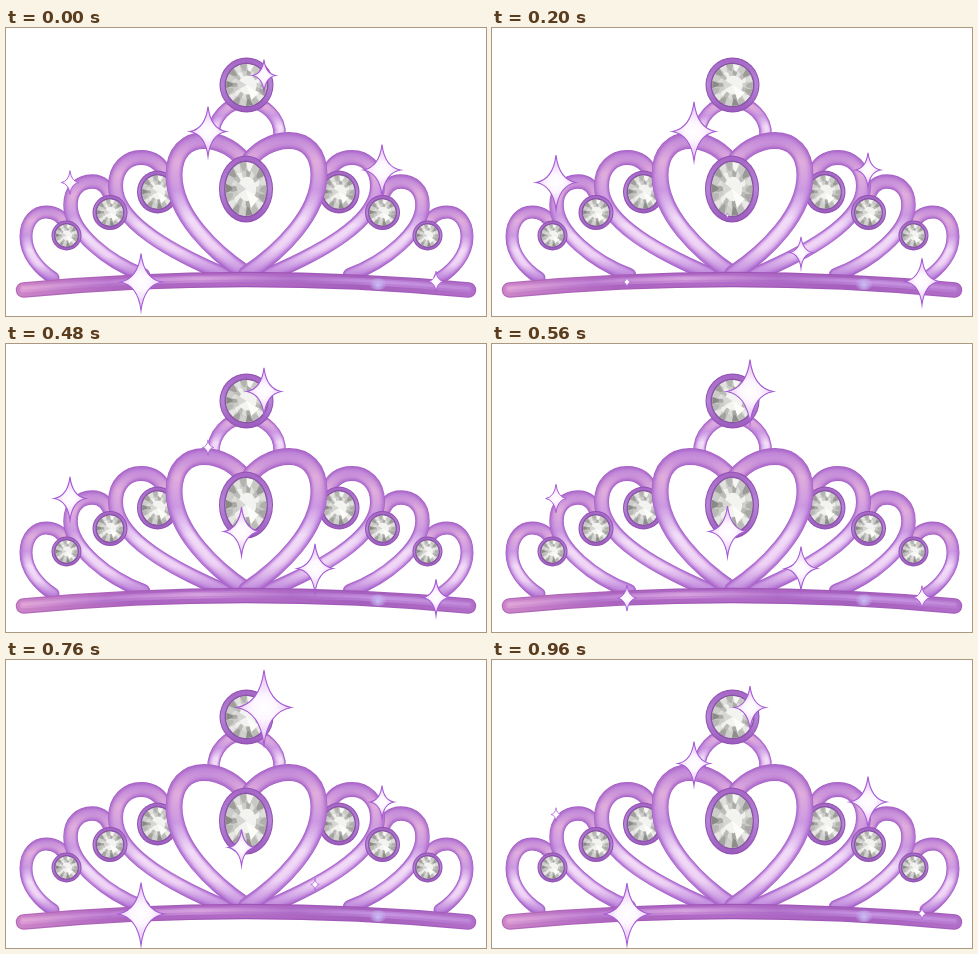
An HTML page with a canvas for the animation above (1000 ms loop, 480 by 288 pixels).

```html
<!DOCTYPE html>
<html>
<head>
<meta charset="utf-8">
<style>
html, body { margin: 0; width: 100%; height: 100%; overflow: hidden; background: #fff; }
canvas { display: block; }
</style>
</head>
<body>
<canvas id="stage" width="480" height="288"></canvas>
<script>
const LOOP = 1000, STEP = 40, SPAN = 377, AXIS = 481;
const ctx = stage.getContext('2d');
const tiara = document.createElement('canvas');
tiara.width = 480;
tiara.height = 288;
const g = tiara.getContext('2d');

function gradient(x0, y0, x1, y1, colors) {
  const fill = g.createLinearGradient(x0, y0, x1, y1);
  colors.forEach((c, i) => fill.addColorStop(i / (colors.length - 1), c));
  return fill;
}

// A shaded tube: rim, body, then a soft highlight set towards the inner side
function tube(d, width, top, bottom) {
  const path = new Path2D(d);
  const body = gradient(0, top, 0, bottom, ['#ad6acb', '#b877d2', '#b374d6', '#bd80dc', '#a964cc']);
  const glow = gradient(0, top, 0, bottom, ['#bb82da', '#e6b5de', '#d09fe4', '#fbeafc', '#f6def8', '#bd84dc']);
  g.lineWidth = width;
  g.strokeStyle = '#a562c5';
  g.stroke(path);
  g.lineWidth = width - 1.5;
  g.strokeStyle = body;
  g.stroke(path);
  g.strokeStyle = glow;
  for (let i = 1; i <= 5; i++) {
    g.save();
    g.translate(i * 0.3, -i * 0.1);
    g.globalAlpha = 0.34;
    g.lineWidth = width * (0.86 - i * 0.12);
    g.stroke(path);
    g.restore();
  }
}

function mirrored(draw) {
  draw();
  g.save();
  g.translate(AXIS, 0);
  g.scale(-1, 1);
  draw();
  g.restore();
}

function ellipse(x, y, rx, ry, fill) {
  g.beginPath();
  g.ellipse(x, y, rx, ry, 0, 0, 7);
  g.fillStyle = fill;
  g.fill();
}

function gem(x, y, rx, ry, rim) {
  ellipse(x, y, rx, ry, '#9150b2');
  ellipse(x, y, rx - 1, ry - 1, gradient(x, y - ry, x, y + ry, ['#a565c6', '#b583d6', '#9a5abd']));
  ellipse(x, y, rx - rim + 1.5, ry - rim + 1.5, '#8a55a6');
  const a = rx - rim, b = ry - rim, n = 18;
  ellipse(x, y, a, b, '#c9c9c6');
  const at = (i, k) => {
    const t = i * 2 * Math.PI / n + 0.2;
    return [x + a * k * Math.cos(t), y + b * k * Math.sin(t)];
  };
  const facet = (points, shade) => {
    g.beginPath();
    points.forEach(p => g.lineTo(...p));
    g.fillStyle = `rgb(${shade},${shade},${shade - 3})`;
    g.fill();
  };
  for (let i = 0; i < n; i++) {
    facet([at(i, 1), at(i + 1, 1), at(i + 0.5, 0.5)], 135 + (i * 67 + 31) % 113);
    facet([at(i, 0.74), at(i + 1, 0.64), [x, y]], 165 + (i * 53 + 20) % 88);
  }
  ellipse(x + a * 0.05, y, a * 0.45, b * 0.45, '#f3f3f1');
  facet([at(7, 0.45), at(10, 0.6), [x, y]], 214);
  facet([at(1, 0.7), at(3, 0.75), [x, y]], 252);
}

function drawTiara() {
  g.lineCap = 'round';
  mirrored(() => {
    tube('M47 250C33 241 20 226 20 209C20 192 30 184 40 184C50 184 57 189 61 199', 13, 178, 252);
    tube('M137 247C102 234 64.5 204 64.5 177C64.5 161 75 153.5 86 153.5C96 153.5 102 159 106 172', 14.5, 146, 249);
    tube('M219 247C167 225 109.5 194 109.5 158C109.5 139 122 129.5 135 129.5C146 129.5 155 135 160 148', 15, 121, 249);
  });
  gem(60.5, 207.5, 15, 15, 4);
  gem(421.5, 207.5, 15, 15, 4);
  gem(104, 184.5, 17.5, 17.5, 4.5);
  gem(376.5, 184.5, 17.5, 17.5, 4.5);
  gem(151.5, 164, 20.5, 21.5, 5);
  gem(333, 164, 20.5, 21.5, 5);
  tube('M207.5 110C206 90 222 74 240.5 74C259 74 275 90 273.5 108', 12.5, 67, 120);
  gem(240.5, 57, 27, 27.5, 6.5);
  mirrored(() =>
    tube('M240.5 246C207 224 168 186 168 147C168 124 181 112.5 198 112.5C215 112.5 232 122 241 138', 17, 104, 250));
  gem(240, 161, 27, 33.5, 6.5);

  const band = new Path2D('M17.5 262Q240 241 462.5 262');
  [
    [15.5, 0, ['#b56bba', '#9d55b4', '#a65fbd']],
    [13, 0, ['#cd86c8', '#ab63c0', '#b26cc8', '#a55fbc', '#b26fc9']],
    [7, -1, ['#db9bd2', '#b473cb', '#c98bd6', '#ac6ac6', '#ba80d6', '#b778d0']],
    [3, -1.5, ['#e2a9d6', '#bf80d3', '#d6a2de', '#b374cc', '#c593e0', '#c088d8']]
  ].forEach(([w, dy, colors]) => {
    g.save();
    g.translate(0, dy);
    g.lineWidth = w;
    g.strokeStyle = gradient(10, 0, 470, 0, colors);
    g.stroke(band);
    g.restore();
  });
  const shine = g.createRadialGradient(372, 257, 0, 372, 257, 9);
  shine.addColorStop(0, '#c9bdf5');
  shine.addColorStop(1, '#c9bdf500');
  ellipse(372, 256, 9, 6, shine);
}

// x, y, largest half height, time of the peak
const sparkles = [
  [258, 47.5, 38, 712], [202, 103.5, 30, 155], [64, 154.5, 29, 290], [376, 142, 25.5, 985],
  [135, 254, 33.5, 855], [430, 253.5, 24.5, 287], [309, 224.5, 25, 430], [235.5, 187.5, 25.5, 558]
];

function sparkle(x, y, size, peak, t) {
  const away = Math.abs((t - peak + 1.5 * LOOP) % LOOP - LOOP / 2);
  const h = size * (1 - (away / SPAN) ** 2);
  if (h < 0.8) return;
  const w = h * 0.73, c = h * 0.11;
  ctx.save();
  ctx.translate(x, y);
  ctx.beginPath();
  ctx.moveTo(0, -h);
  ctx.quadraticCurveTo(c, -c, w, 0);
  ctx.quadraticCurveTo(c, c, 0, h);
  ctx.quadraticCurveTo(-c, c, -w, 0);
  ctx.quadraticCurveTo(-c, -c, 0, -h);
  const fill = ctx.createRadialGradient(0, 0, 0, 0, 0, h);
  fill.addColorStop(0, '#fff');
  fill.addColorStop(0.3, '#fdf7ff');
  fill.addColorStop(1, '#dfb5f3');
  ctx.fillStyle = fill;
  ctx.fill();
  ctx.strokeStyle = '#a45bd3';
  ctx.lineWidth = Math.min(1.1, 0.4 + h * 0.04);
  ctx.stroke();
  ctx.restore();
}

function frame(now) {
  const t = Math.floor(now % LOOP / STEP) * STEP;
  ctx.fillStyle = '#fff';
  ctx.fillRect(0, 0, 480, 288);
  ctx.drawImage(tiara, 0, 0);
  sparkles.forEach(s => sparkle(...s, t));
  requestAnimationFrame(frame);
}

drawTiara();
frame(0);
</script>
</body>
</html>
```
